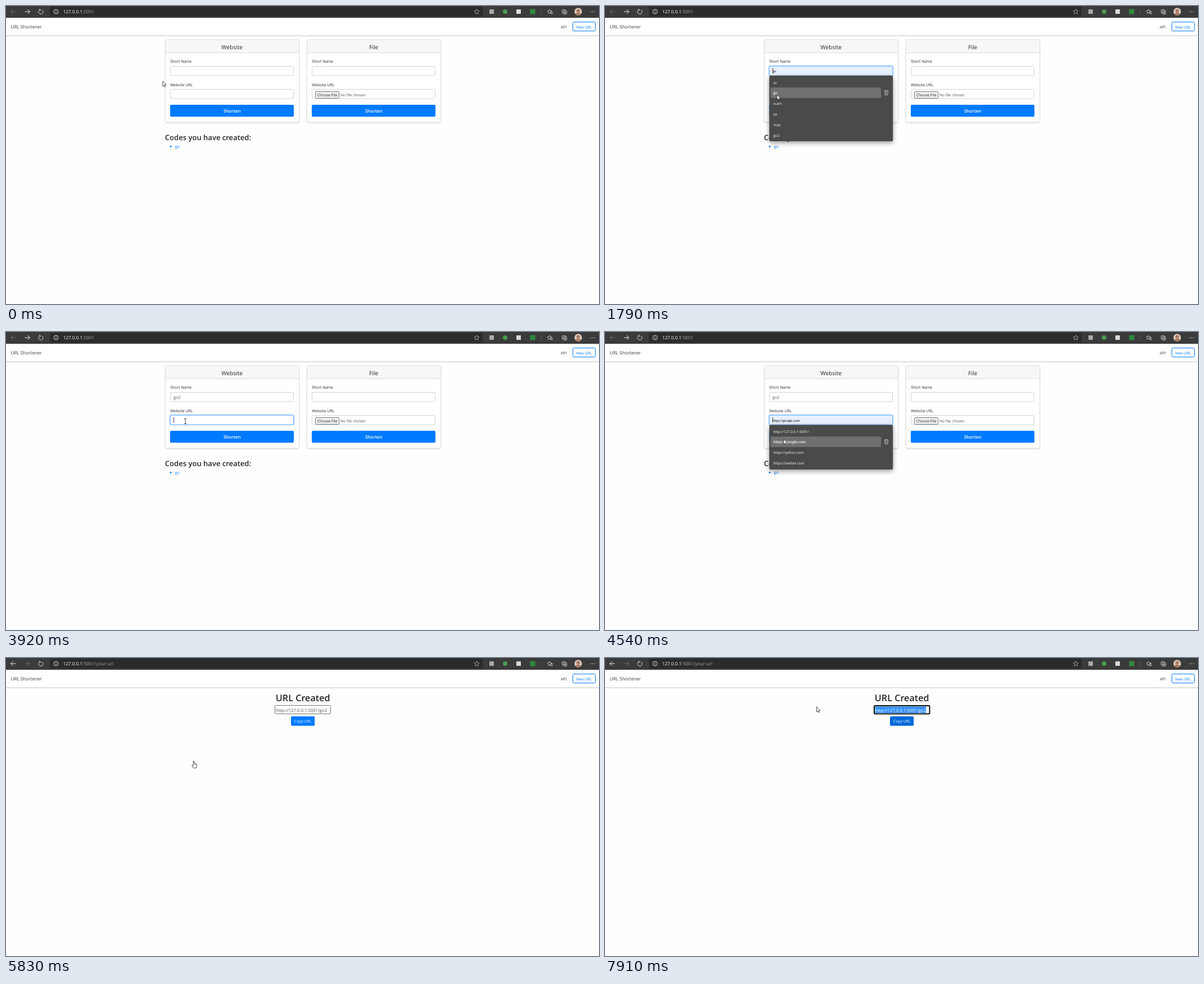
An HTML page with a canvas for the animation above (8 s loop, 1055x531 px).

```html
<!DOCTYPE html>
<html lang="en">
<head>
<meta charset="utf-8">
<title>URL Shortener</title>
<style>
html, body { margin: 0; width: 100%; height: 100%; overflow: hidden; background: #fefefe; }
canvas { display: block; width: 1055px; height: 531px; }
</style>
</head>
<body>
<canvas id="stage" width="1055" height="531"></canvas>
<script>
const c = document.getElementById('stage').getContext('2d');
const LOOP = 8000, BLUE = '#007bff', HOVER = '#0069d9', INK = '#212529', GREY = '#495057';
const SANS = '"Open Sans", "Noto Sans", sans-serif', ARIAL = '"Liberation Sans", Arial, sans-serif';
const clamp = v => Math.max(0, Math.min(1, v));
const within = (p, x, y, w, h) => p.x >= x && p.x <= x + w && p.y >= y && p.y <= y + h;

// Pointer moves: start, last step, number of steps, destination
const moves = [
  [80, 470, 6, 315, 118.5], [920, 1380, 7, 306, 158], [2110, 2360, 4, 321, 126],
  [3460, 3780, 5, 319, 159], [4300, 4540, 4, 318, 191], [4850, 5080, 4, 334, 184],
  [6190, 6980, 11, 528, 115], [7050, 7130, 2, 535, 115], [7750, 7910, 3, 376.5, 87]
];
const names = { top: 124, first: 136, bottom: 241, items: ['ss', 'go', 'scam', 'ya', 'map', 'go2'] };
const links = { top: 165.5, first: 177, bottom: 245,
  items: ['http://127.0.0.1:5001/', 'https://google.com', 'https://yahoo.com', 'https://twitter.com'] };
const ROW = 18.8;

function pointer(t) {
  let x = 279, y = 134;
  for (const [start, end, steps, tx, ty] of moves) {
    if (t < start) break;
    const gap = (end - start) / (steps - 1);
    const k = Math.min(steps, Math.floor((t - start) / gap + 1e-6) + 1) / steps;
    const e = k * k * (3 - 2 * k);
    x += (tx - x) * e;
    y += (ty - y) * e;
  }
  return { x, y };
}

// y is the middle of the capital letters
function text(s, x, y, size, color = INK, { weight = 400, align = 'left', family = SANS } = {}) {
  c.font = `${weight} ${size}px ${family}`;
  c.textAlign = align;
  c.fillStyle = color;
  c.fillText(s, x, y + size * 0.36);
}

function box(x, y, w, h, r, fill, stroke, width = 1) {
  c.beginPath();
  c.roundRect(x, y, w, h, r);
  if (fill) { c.fillStyle = fill; c.fill(); }
  if (stroke) { c.strokeStyle = stroke; c.lineWidth = width; c.stroke(); }
}

function line(points, color, width = 1, fill) {
  c.beginPath();
  for (let i = 0; i < points.length; i += 2) c.lineTo(points[i], points[i + 1]);
  if (fill) { c.closePath(); c.fillStyle = fill; c.fill(); }
  c.strokeStyle = color;
  c.lineWidth = width;
  c.stroke();
}

function ring(x, y, r, color, from = 0, to = 2 * Math.PI) {
  c.beginPath();
  c.arc(x, y, r, from, to);
  c.strokeStyle = color;
  c.lineWidth = 1;
  c.stroke();
}

function dot(x, y, r, color) {
  c.beginPath();
  c.arc(x, y, r, 0, 2 * Math.PI);
  c.fillStyle = color;
  c.fill();
}

function star(x, y, r, color) {
  const pts = [];
  for (let i = 0; i <= 10; i++) {
    const a = i * Math.PI / 5 - Math.PI / 2, d = i % 2 ? r * 0.48 : r;
    pts.push(x + d * Math.cos(a), y + d * Math.sin(a));
  }
  line(pts, color, 0.8);
}

function shadow(color, blur, dy, draw) {
  c.save();
  c.shadowColor = color;
  c.shadowBlur = blur;
  c.shadowOffsetY = dy;
  draw();
  c.restore();
}

function browser(created) {
  const pale = '#d8d8d8', dim = '#777';
  c.fillStyle = '#3b3b3b';
  c.fillRect(0, 0, 1055, 21);
  box(78, 1, 770, 17.5, 2, '#2b2b2b');
  for (const [x, dir, on] of [[13, -1, created], [38, 1, !created]]) {
    const color = on ? '#f0f0f0' : dim;
    line([x - 4.5, 10, x + 4.5, 10], color);
    line([x + dir * 0.5, 6, x + dir * 4.5, 10, x + dir * 0.5, 14], color);
  }
  ring(62, 10.3, 4, pale, -1, 4.3);
  line([60, 4.8, 60, 7.4, 62.6, 7.4], pale);
  ring(89, 10, 4, pale);
  line([89, 9.3, 89, 12.3], pale);
  line([89, 7.5, 89, 8.5], pale);
  text('127.0.0.1', 101.8, 10.2, 8.1, '#fff');
  text(':5001' + (created ? '/your-url' : ''), 136.2, 10.2, 8.25, '#a5a5a5');
  star(837.5, 10.3, 4.7, '#bbb');
  box(860, 6, 8, 8, 0, '#a9a9a9');
  dot(888, 10, 4, '#4b9b50');
  box(908, 6, 8, 8, 0, '#dadada');
  box(932.5, 5.5, 9, 9, 0, '#2f8a3c');
  line([952.5, 6, 952.5, 15], '#575757');
  star(967, 10, 4, pale);
  line([969, 10.5, 973, 10.5], pale);
  line([969, 13.5, 973, 13.5], pale);
  box(989.5, 6.5, 6, 6, 1, null, pale, 0.9);
  box(991.5, 8.5, 6, 6, 1, '#3b3b3b', pale, 0.9);
  line([994.5, 9.5, 994.5, 13.5], pale);
  line([992.5, 11.5, 996.5, 11.5], pale);
  c.save();
  c.beginPath();
  c.arc(1018, 10, 6.7, 0, 2 * Math.PI);
  c.clip();
  c.fillStyle = '#d9c8bb';
  c.fillRect(1010, 2, 16, 16);
  dot(1018, 8.5, 3, '#a87860');
  dot(1018, 17, 5.5, '#a87860');
  c.restore();
  for (const x of [1040, 1043.5, 1047]) dot(x, 10.3, 0.8, pale);
}

function navbar() {
  shadow('rgba(0,0,0,.3)', 3, 0.5, () => {
    c.fillStyle = '#fff';
    c.fillRect(-5, 21, 1065, 31);
  });
  text('URL Shortener', 8.6, 37.5, 8.15, '#343a40');
  text('API', 987, 37.3, 6.9, '#343a40');
  box(1008.5, 28.5, 40, 16, 2, '#fff', BLUE);
  text('New URL', 1028.2, 37.2, 6.65, BLUE, { align: 'center' });
}

function field(x, y, { focus = 0, fill = '#fff' } = {}) {
  if (focus) box(x - 0.5, y - 0.5, 221, 18, 3, null, `rgba(0,123,255,${0.3 * focus})`, 2);
  box(x + 0.5, y + 0.5, 219, 16.5, 2, fill, focus > 0.5 ? '#80bdff' : '#ced4da');
}

function caret(x, y) {
  c.fillStyle = '#222';
  c.fillRect(x, y - 5, 0.9, 10);
}

function card(x, title, color, glow) {
  shadow('rgba(0,0,0,.16)', 3, 1.2, () => box(x + 0.5, 60, 238, 147, 2, '#fff'));
  box(x + 0.5, 60, 238, 23.5, [2, 2, 0, 0], '#f7f7f7');
  box(x + 0.5, 60, 238, 147, 2, null, '#dfdfdf');
  line([x, 83.5, x + 238.5, 83.5], '#dfdfdf');
  text(title, x + 119.2, 73, 10.15, INK, { align: 'center' });
  text('Short Name', x + 9.2, 98.8, 6.8);
  text('Website URL', x + 9.2, 140.3, 6.8);
  if (glow) box(x + 8, 175, 222, 23.3, 3, null, `rgba(0,123,255,${0.5 * glow})`, 2);
  box(x + 9, 176, 220, 21.3, 2, color);
  text('Shorten', x + 119.2, 187, 8, '#fff', { weight: 600, align: 'center' });
}

function menu({ top, first, bottom, items }, active) {
  shadow('rgba(0,0,0,.4)', 9, 3, () => box(292.3, top, 219.9, bottom - top, 2, '#4a4a4a'));
  items.forEach((item, i) => {
    const y = first + i * ROW, on = i === active;
    if (on) {
      box(294.5, y - 9.5, 196.5, 18.8, 1, '#707070');
      line([496.5, y - 3, 504.5, y - 3], '#ccc', 0.8);
      line([499, y - 3, 499, y - 4.5, 502, y - 4.5, 502, y - 3], '#ccc', 0.8);
      line([497.5, y - 3, 498, y + 4, 503, y + 4, 503.5, y - 3], '#ccc', 0.8);
      line([499.7, y - 1, 499.7, y + 2.3], '#ccc', 0.7);
      line([501.4, y - 1, 501.4, y + 2.3], '#ccc', 0.7);
    }
    text(item, 299.4, y + 0.3, 6.3, '#fff', { weight: on ? 600 : 400 });
  });
}

function formPage(t, p) {
  const open = t >= 540 && t < 1880 ? names : t >= 3930 && t < 4700 ? links : null;
  const active = open && p.y > open.first - 9.5 ? Math.floor((p.y - open.first + 9.5) / ROW) : -1;
  const pick = active >= 0 ? open.items[active] : '';
  const over = !open && within(p, 292, 176, 220, 21);
  const onField = within(p, 292, 107, 220, 17) || within(p, 292, 148, 220, 17);

  const press = t >= 5150;
  card(283, 'Website', press ? '#0062cc' : over ? HOVER : BLUE, press ? clamp((t - 5080) / 150) : 0);
  card(535, 'File', BLUE, 0);

  const nameFocus = t < 3780 ? clamp((t - 400) / 150) : 1 - clamp((t - 3705) / 150);
  const urlFocus = press ? 1 - clamp((t - 5080) / 150) : clamp((t - 3705) / 150);
  const namePick = open === names && pick, urlPick = open === links && pick;
  const nameFilled = namePick || (t >= 1880 && t < 3060);
  const urlFilled = urlPick || t >= 4700;
  field(292, 107, { focus: nameFocus, fill: nameFilled ? '#e8f0fe' : '#fff' });
  field(292, 148, { focus: urlFocus, fill: urlFilled ? '#e8f0fe' : '#fff' });
  field(544, 107);
  field(544, 148);
  box(550.5, 152.5, 42, 12, 1, '#efefef', '#767676');
  text('Choose File', 571.6, 159, 6.7, '#222', { align: 'center' });
  text('No file chosen', 595, 158.8, 6.75, GREY);

  const name = t < 1880 ? '' : t < 3060 ? 'go' : 'go2';
  const url = t >= 4700 ? links.items[1] : '';
  const preview = { family: ARIAL };
  if (namePick) text(namePick, 298, 116.3, 6, '#111', preview);
  else text(name, 298, 116, 7.2, t < 3060 ? '#222' : GREY);
  if (urlPick) text(urlPick, 298, 157.7, 5.95, '#111', preview);
  else text(url, 298, 157.3, 7.2, '#222');

  const since = t < 1880 ? 470 : t < 3060 ? 1880 : t < 3780 ? 3060 : t < 4700 ? 3780 : 4700;
  const blink = open || (t - since) % 1030 < 480;
  if (t >= 470 && !press && blink) {
    const second = t >= 3780;
    c.font = `7.2px ${SANS}`;
    caret(298 + c.measureText(second ? url : name).width, second ? 156.8 : 115.3);
  }

  text('Codes you have created:', 282.8, 234.2, 13.05, INK, { weight: 600 });
  dot(293, 250.3, 1.5, BLUE);
  text('go', 300.8, 250.3, 7, BLUE);
  if (open) menu(open, active);

  if (open && p.y >= open.top) return arrow;
  return over ? hand : onField ? beam : arrow;
}

function createdPage(t, p) {
  const selected = t >= 7670;
  const over = within(p, 507, 104, 42, 17);
  text('URL Created', 528.2, 71.5, 16.2, INK, { weight: 600, align: 'center' });
  if (selected) box(479, 85, 98.5, 14.5, 1, '#fff', '#101010', 2);
  else box(478.5, 84.5, 99, 15, 1, '#fff', '#767676');
  if (selected) {
    c.fillStyle = '#3390ff';
    c.fillRect(480.3, 86.5, 91, 11.5);
  }
  text('http://127.0.0.1:5001/go2', 480.3, 93, 7.7, selected ? '#fff' : GREY);
  box(507, 104, 42.2, 16.8, 2, over || selected ? HOVER : BLUE);
  text('Copy URL', 528.2, 112.8, 6.9, '#fff', { align: 'center' });
  if (t < 6190 || over) return hand;
  return within(p, 478, 84, 100, 16) ? beam : arrow;
}

function arrow() {
  line([0, 0, 0, 9, 2, 7.2, 3.4, 10.2, 4.8, 9.6, 3.5, 6.7, 6.2, 6.5, 0, 0], '#222', 0.8, '#fff');
}

function beam() {
  line([-2, -4.5, 2, -4.5], '#222', 0.8);
  line([0, -4.5, 0, 4.5], '#222', 0.8);
  line([-2, 4.5, 2, 4.5], '#222', 0.8);
}

function hand() {
  c.lineJoin = 'round';
  line([-0.7, 0, 0.7, 0, 0.9, 4, 2.5, 4.2, 4, 4.8, 5.3, 5.6, 5.2, 9, 4.2, 12, -0.6, 12,
    -3.3, 7.5, -2.6, 6.6, -0.8, 8, -0.7, 0], '#222', 0.8, '#fff');
  line([2.5, 4.3, 2.5, 6.6], '#222', 0.5);
  line([4, 4.9, 4, 6.8], '#222', 0.5);
}

function draw(t) {
  const created = t >= 5680, p = pointer(t);
  c.fillStyle = '#fefefe';
  c.fillRect(0, 0, 1055, 531);
  navbar();
  browser(created);
  const cursor = (created ? createdPage : formPage)(t, p);
  c.save();
  c.translate(p.x, p.y);
  cursor();
  c.restore();
}

c.textRendering = 'geometricPrecision';
const begin = performance.now();
function tick() {
  draw((performance.now() - begin) % LOOP);
  requestAnimationFrame(tick);
}
tick();
</script>
</body>
</html>
```
